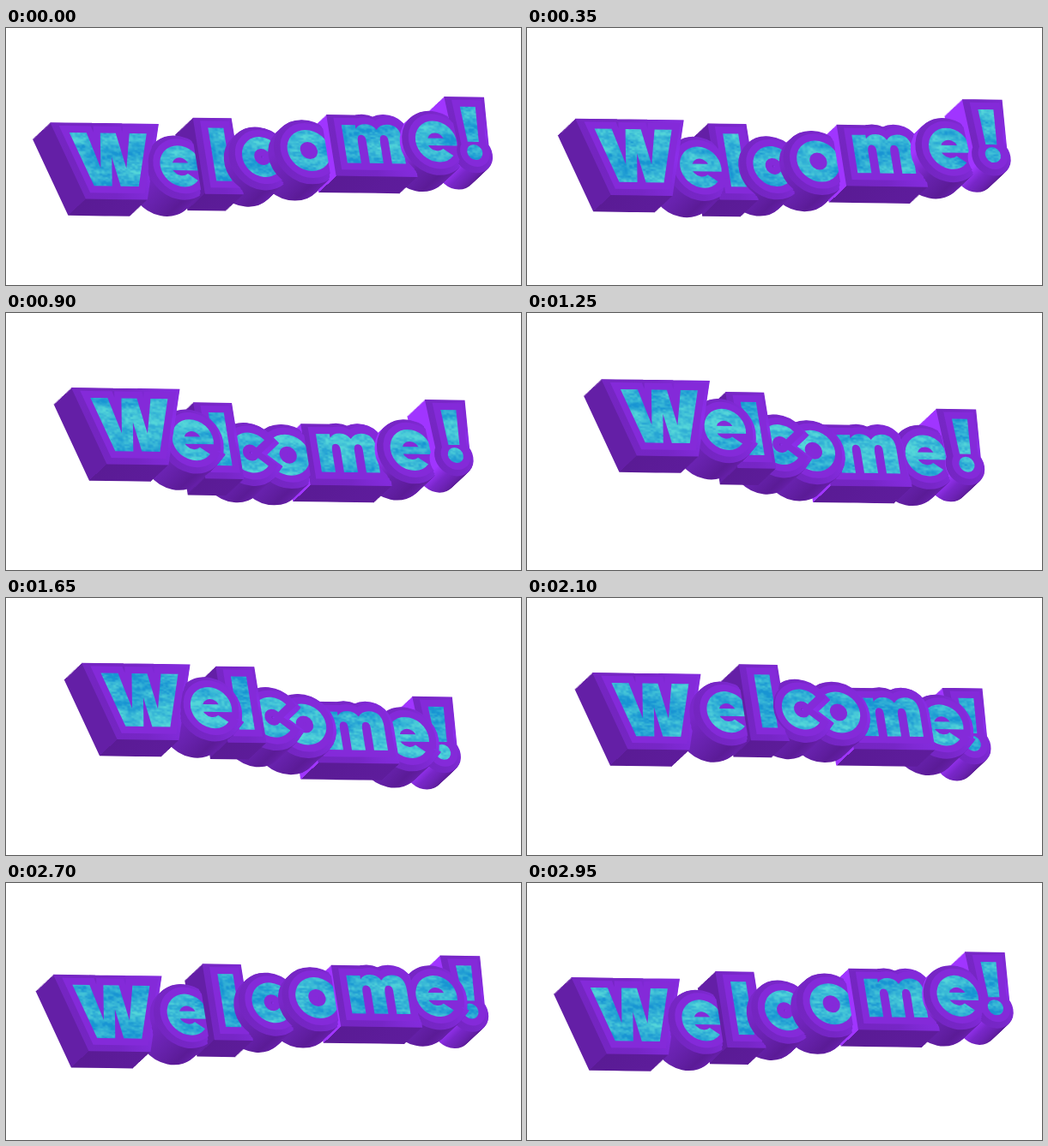
These frames come from a looping animation (600 by 300 pixels, 3 s). An HTML page with a canvas:

```html
<!DOCTYPE html>
<html lang="en">
<head>
<meta charset="utf-8">
<title>Welcome!</title>
<style>
html, body { margin: 0; width: 100%; height: 100%; overflow: hidden; background: #fff; }
canvas { display: block; }
</style>
</head>
<body>
<canvas id="stage" width="600" height="300" role="img" aria-label="Welcome!"></canvas>
<script>
const ctx = document.getElementById('stage').getContext('2d');
const LOOP = 3000, STEP = 50, SWING = 18.8, RISE = 0.94, LAG = 0.465;
const DEPTH = 20.5, BEVEL = 2, MARGIN = 13.5, RING = 8, TILE = 128;
const PI = Math.PI;

// Glyph outlines: straight letters stand on y = 0, round ones are centred on it.
function glyphE() {
  const p = new Path2D();
  p.arc(0, 0, 24, 0.2, 0.75, true);
  p.arc(0, 0, 11, 0.9, PI - 0.45);
  p.closePath();
  p.moveTo(10 * Math.cos(PI + 0.4), 10 * Math.sin(PI + 0.4));
  p.arc(0, 0, 10, PI + 0.4, -0.4);
  p.closePath();
  return p;
}
function glyphC() {
  const p = new Path2D();
  p.arc(0, 0, 23.5, -0.7, 0.7, true);
  p.arc(0, 0, 9.5, 0.7, -0.7);
  p.closePath();
  return p;
}
function glyphO() {
  const p = new Path2D();
  p.ellipse(0, 0, 25, 24, 0, 0, 2 * PI);
  p.closePath();
  p.moveTo(10, 0);
  p.arc(0, 0, 10, 0, 2 * PI);
  p.closePath();
  return p;
}
const W = new Path2D('M-45-62H-25L-15-21L-9-62H9L15-21L25-62H45L26 0H5L0-34L-5 0H-26Z');
const L = new Path2D('M-9 0V-62H9V0Z');
const M = new Path2D('M-34 0V-44.5H-18V-40Q-14-45.5-6-45.5Q2-45.5 6-39Q11-45.5 19-45.5Q34-45.5 34-28V0H18V-26Q18-33 13-33Q8-33 8-25V0H-8V-26Q-8-33-13-33Q-18-33-18-25V0Z');
const BANG = new Path2D('M-9-62H9L6.5-21H-6.5ZM9-9A9 9 0 1 1-9-9A9 9 0 1 1 9-9Z');

// Shading by the direction from a letter's middle; stops run clockwise from the right.
function conic(midY, stops) {
  const g = ctx.createConicGradient(0, 0, midY);
  for (const [at, color] of stops) g.addColorStop(at, color);
  return g;
}
const flat = (midY, corner, left) => conic(midY, [
  [0, '#9a35ff'], [0.09, '#5e1c9c'], [corner, '#5a1b95'], [corner, left], [0.8, left], [1, '#9a35ff']]);
const round = left => conic(0, [
  [0, '#7a27ca'], [0.13, '#6a21b0'], [0.25, '#5b1b97'], [0.36, '#6822ae'],
  [0.5, left], [0.62, left], [1, '#7a27ca']]);
const bevel = midY => conic(midY, [
  [0, '#8c2eea'], [0.25, '#7626c6'], [0.5, '#7425c0'], [0.75, '#7827c8'], [1, '#8c2eea']]);

const DARK = '#641fa6', MIDDLE = '#7a27ca', BRIGHT = '#a035ff';
const letters = [
  [W, 147.5, 167, -31, flat(-31, 0.358, DARK)],
  [glyphE(), 220.5, 145.5, 0, round(MIDDLE)],
  [L, 265.5, 168, -31, flat(-31, 0.325, DARK)],
  [glyphC(), 302, 147.5, 0, round(MIDDLE)],
  [glyphO(), 347.5, 148, 0, round(MIDDLE)],
  [M, 419, 170, -23, flat(-23, 0.395, BRIGHT)],
  [glyphE(), 483.5, 149, 0, round(BRIGHT)],
  [BANG, 529, 171.5, -30, conic(-30, [
    [0, '#9a35ff'], [0.12, '#6a21b0'], [0.2, '#5a1b95'], [0.29, '#7826c8'],
    [0.34, BRIGHT], [0.8, BRIGHT], [1, '#9a35ff']])]
].map(([path, x, y, midY, side]) => ({ path, x, y, side, edge: bevel(midY) }));

// Seamless streaky water tile.
function hash(i, j, seed) {
  const v = Math.sin(i * 127.1 + j * 311.7 + seed * 74.7) * 43758.5453;
  return v - Math.floor(v);
}
function noise(x, y, nx, ny) {
  const u = x / TILE * nx, v = y / TILE * ny;
  const i = Math.floor(u), j = Math.floor(v);
  const ease = f => f * f * (3 - 2 * f);
  const a = ease(u - i), b = ease(v - j);
  const at = (di, dj) => hash((i + di) % nx, (j + dj) % ny, nx);
  const mix = (p, q, f) => p + (q - p) * f;
  return mix(mix(at(0, 0), at(1, 0), a), mix(at(0, 1), at(1, 1), a), b);
}
function waterPattern() {
  const tile = document.createElement('canvas');
  tile.width = tile.height = TILE;
  const c = tile.getContext('2d');
  const img = c.createImageData(TILE, TILE);
  for (let y = 0, k = 0; y < TILE; y++) {
    for (let x = 0; x < TILE; x++, k += 4) {
      const n = 0.4 * noise(x, y, 3, 12) + 0.3 * noise(x, y, 9, 30) + 0.3 * noise(x, y, 42, 64);
      const f = Math.min(1, Math.max(0, (n - 0.5) * 1.8 + 0.5));
      img.data[k] = 24 + 60 * f;
      img.data[k + 1] = 148 + 66 * f;
      img.data[k + 2] = 211 + 6 * f;
      img.data[k + 3] = 255;
    }
  }
  c.putImageData(img, 0, 0);
  return ctx.createPattern(tile, 'repeat');
}
const water = waterPattern();

function place(letter, z) {
  ctx.setTransform(1, 0.014, 0.16, 1, letter.x + z, letter.y - RISE * z);
}
function slab(letter, z, margin, paint) {
  place(letter, z);
  ctx.fillStyle = ctx.strokeStyle = paint;
  ctx.lineWidth = 2 * margin;
  ctx.fill(letter.path);
  ctx.stroke(letter.path);
}
function face(letter, z, scroll) {
  slab(letter, z, RING, '#842ad9');
  water.setTransform(new DOMMatrix([1, 0, 0, 1, -letter.x, scroll]));
  ctx.fillStyle = water;
  ctx.fill(letter.path, 'evenodd');
}

function draw(time) {
  const phase = time / LOOP;
  const layers = [];
  letters.forEach((letter, i) => {
    const front = -SWING * Math.cos(2 * PI * phase - i * LAG);
    const add = (z, paint) => layers.push({ z, paint });
    for (let d = DEPTH + BEVEL; d >= BEVEL; d--) {
      add(front - d, () => slab(letter, front - d, MARGIN, letter.side));
    }
    for (let d = BEVEL; d > 0; d -= 0.5) {
      const margin = RING + (MARGIN - RING) * d / BEVEL;
      add(front - d, () => slab(letter, front - d, margin, letter.edge));
    }
    add(front, () => face(letter, front, TILE * phase));
  });

  ctx.setTransform(1, 0, 0, 1, 0, 0);
  ctx.fillStyle = '#fff';
  ctx.fillRect(0, 0, 600, 300);
  ctx.lineJoin = 'miter';
  ctx.miterLimit = 2;
  // Back to front, so that overlapping letters cut into each other.
  layers.sort((a, b) => a.z - b.z).forEach(layer => layer.paint());
}

const start = performance.now();
let shown = -1;
function tick() {
  const time = Math.floor((performance.now() - start) % LOOP / STEP) * STEP;
  if (time !== shown) draw(shown = time);
  requestAnimationFrame(tick);
}
tick();
</script>
</body>
</html>
```
